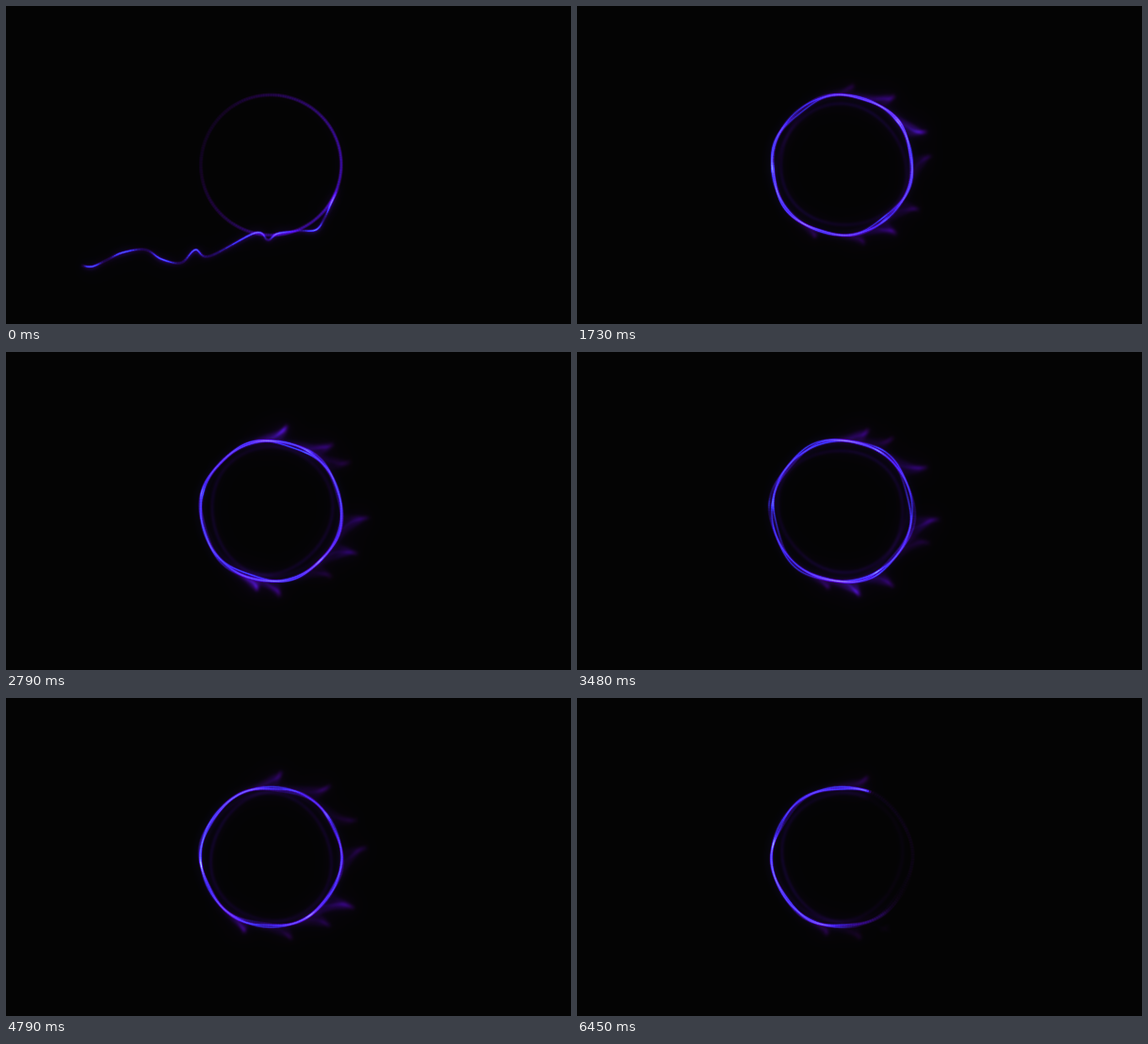
Write an HTML page with a canvas that moves like this. It is 600 px wide and 338 px high and loops after 6.48 s.

```html
<!DOCTYPE html>
<html lang="en">
<head>
<meta charset="utf-8">
<title>Plasma ring</title>
<style>
html, body { margin: 0; width: 100%; height: 100%; overflow: hidden; background: #040404; }
canvas { display: block; width: 100vw; height: 100vh; }
</style>
</head>
<body>
<canvas id="stage" width="600" height="338"></canvas>
<script>
const W = 600, H = 338, LOOP = 6480;
const CX = 281.5, CY = 169, R = 74.6;
const PLUMES = 8, SPARKS = 3;
const out = document.getElementById('stage').getContext('2d');

function layer() {
  const c = document.createElement('canvas');
  c.width = W;
  c.height = H;
  return c.getContext('2d');
}
const sharp = layer(), soft = layer();

// Angles are in degrees, clockwise from the right
const sin = deg => Math.sin(deg * Math.PI / 180);
const cos = deg => Math.cos(deg * Math.PI / 180);
const wrap = deg => ((deg + 180) % 360 + 360) % 360 - 180;
const bell = (d, width) => Math.exp(-((d / width) ** 2));
const mix = (a, b, k) => a + (b - a) * k;
const polar = (deg, r) => [CX + r * cos(deg), CY + r * sin(deg)];
const ramp = (v, a, b) => {
  const k = Math.min(1, Math.max(0, (v - a) / (b - a)));
  return k * k * (3 - 2 * k);
};

// Passes from violet halo to white core: width, colour, strength
const PASSES = [
  [3.4, '75,0,165', b => .5 * b * (1 - .4 * b)],
  [1.9, '35,25,255', b => .8 * b ** 2.3],
  [1, '20,150,255', b => (b - .45) * 1.2],
  [1.2, '160,210,255', b => b - .95]
];

function line(g, path, scale = 1) {
  for (const [width, rgb, strength] of PASSES) {
    g.lineWidth = width * scale;
    for (let i = 1; i < path.length; i++) {
      const [x0, y0, b0] = path[i - 1], [x1, y1, b1] = path[i];
      const alpha = Math.min(1, strength(Math.max(0, (b0 + b1) / 2)));
      if (alpha < .01) continue;
      g.strokeStyle = `rgba(${rgb},${alpha.toFixed(3)})`;
      g.beginPath();
      g.moveTo(x0, y0);
      g.lineTo(x1, y1);
      g.stroke();
    }
  }
}

function circle(g, radius, power, scale) {
  const path = [];
  for (let a = 0; a <= 360; a += 2) path.push([...polar(a, radius(a)), power(a)]);
  line(g, path, scale);
}

const ignite = t => ramp(t, 0, 850);

// Ring brightness: it lights up, then dies along the right side
function level(a, t) {
  const ember = .34 + .2 * cos(a - 20);
  const full = .86 + .07 * sin(2 * a + t / 12);
  const w = wrap(a);
  const dying = ramp(w, -70, -65) * (1 - ramp(w, 25, 115));
  return mix(ember, full, ignite(t)) * (1 - .93 * dying * ramp(t, 4400, 6100));
}

function drawRing(t) {
  const lit = ignite(t);
  const wave = 3 * ramp(t, 700, 1700);

  const heat = a => {
    let sum = 0;
    for (let i = 0; i < SPARKS; i++) {
      const at = 55 + 128 * i + 12 * sin(t / 9 + 140 * i);
      sum += bell(wrap(a - at), 4);
    }
    return sum * lit * level(a, t);
  };

  circle(sharp, () => R, a => level(a, t) * .82 + heat(a) * .3, 1);
  for (let n = 0; n < 2; n++) {
    const p = t / 11 + n * 120;
    const radius = a => R - .8 + n * 1.2 +
      wave * sin((2 + n) * a + p) * sin((4 - n) * a - p * .7);
    const power = a => level(a, t) * (.7 + .15 * sin(4 * a + p * 1.4)) + heat(a) * .25;
    circle(sharp, radius, power, .9);
  }

  // Faint loose strands inside
  for (let n = 0; n < 2; n++) {
    const dir = 215 - (t - 910) * .1 + 150 * n;
    const radius = a => R - 6 - 5 * cos(a - dir) - 1.5 * sin(3 * a + t / 9);
    const power = a => .38 * lit * (.6 + .4 * cos(a - dir)) * (.3 + .7 * level(a, t));
    circle(soft, radius, power, 1);
  }
}

// Flame of filaments that leave the ring side by side and meet at one tip
function drawPlume(i, t) {
  const home = -78 + 26 * i;
  const tip = home + 6 * sin(t / 8 + i * 137);
  const root = tip + (home < -12 ? -20 : 16);
  const pulse = .72 + .28 * sin(t / 6.5 + i * 109);
  const grow = mix(.5, 1, ramp(t, 700, 2600));
  const height = (14 + 14 * cos(home)) * grow * (.8 + .3 * pulse);
  const power = .85 * pulse * ramp(t, 150, 900) * level(tip, t) ** 2;
  if (power < .02) return;

  for (let n = -3; n <= 3; n++) {
    const path = [];
    for (let u = 0; u <= 1.001; u += 1 / 16) {
      const a = mix(root + n * 5, tip, 1 - (1 - u) ** 1.6);
      const curl = 1.6 * u * sin(u * 460 + t / 3.5 + n * 50 + i * 90);
      const fade = (.5 + .5 * u) * (1 - ramp(u, .7, 1.08));
      path.push([...polar(a, R + height * u ** 1.6 + curl), power * fade * (n ? .42 : 1)]);
    }
    line(soft, path, n ? 1.4 : .9);
  }
}

// Entry bolt: bends of its path, every second one glowing
const BENDS = [
  [78, 275], [91, 277], [107, 270], [124, 262], [148, 259], [165, 269],
  [186, 273], [201, 259], [216, 266], [265, 241], [278, 249], [288, 242],
  [310, 239], [329, 238], [338, 226], [346, 208], [355, 190]
];

function spline(points, steps) {
  const path = [];
  const last = points.length - 1;
  for (let s = 0; s <= last * steps; s++) {
    const i = Math.min(last - 1, Math.floor(s / steps)), k = s / steps - i;
    const near = [-1, 0, 1, 2].map(n => points[Math.min(last, Math.max(0, i + n))]);
    path.push([0, 1].map(axis => {
      const [a, b, c, d] = near.map(q => q[axis]);
      return b + k / 2 * (c - a + k * (2 * a - 5 * b + 4 * c - d + k * (3 * (b - c) + d - a)));
    }));
  }
  return path;
}
const STEPS = 8, boltPath = spline(BENDS, STEPS);

function drawBolt(t) {
  if (t > 900) return;
  const path = boltPath.map(([x, y], i) => {
    const u = i / (boltPath.length - 1);
    const sway = t * .006 * sin(i * 8 + t / 5);
    const glow = .62 + .14 * u - .27 * cos(180 * i / STEPS);
    const ends = ramp(u, 0, .04) * (1 - ramp(u, .94, 1));
    const fade = 1 - ramp(t, 20 + 220 * u, 560 + 300 * u);
    return [x + sway / 2, y + sway, glow * ends * fade];
  });
  line(sharp, path, .95);
  line(soft, path.map(([x, y, b]) => [x, y + 1, b * .45]), 1.6);
}

function overlay(source, blur, alpha) {
  out.filter = blur ? `blur(${blur}px)` : 'none';
  out.globalAlpha = alpha;
  out.drawImage(source.canvas, 0, 0);
}

function frame() {
  const t = performance.now() % LOOP;
  for (const g of [sharp, soft]) {
    g.globalCompositeOperation = 'source-over';
    g.clearRect(0, 0, W, H);
    g.globalCompositeOperation = 'lighter';
  }
  drawRing(t);
  for (let i = 0; i < PLUMES; i++) drawPlume(i, t);
  drawBolt(t);

  out.filter = 'none';
  out.globalAlpha = 1;
  out.globalCompositeOperation = 'source-over';
  out.fillStyle = '#040404';
  out.fillRect(0, 0, W, H);
  out.globalCompositeOperation = 'lighter';
  overlay(soft, 12, .35);
  overlay(soft, 4, .35);
  overlay(soft, .8, .8);
  overlay(sharp, 4, .15);
  overlay(sharp, 0, 1);
  requestAnimationFrame(frame);
}
frame();
</script>
</body>
</html>
```
